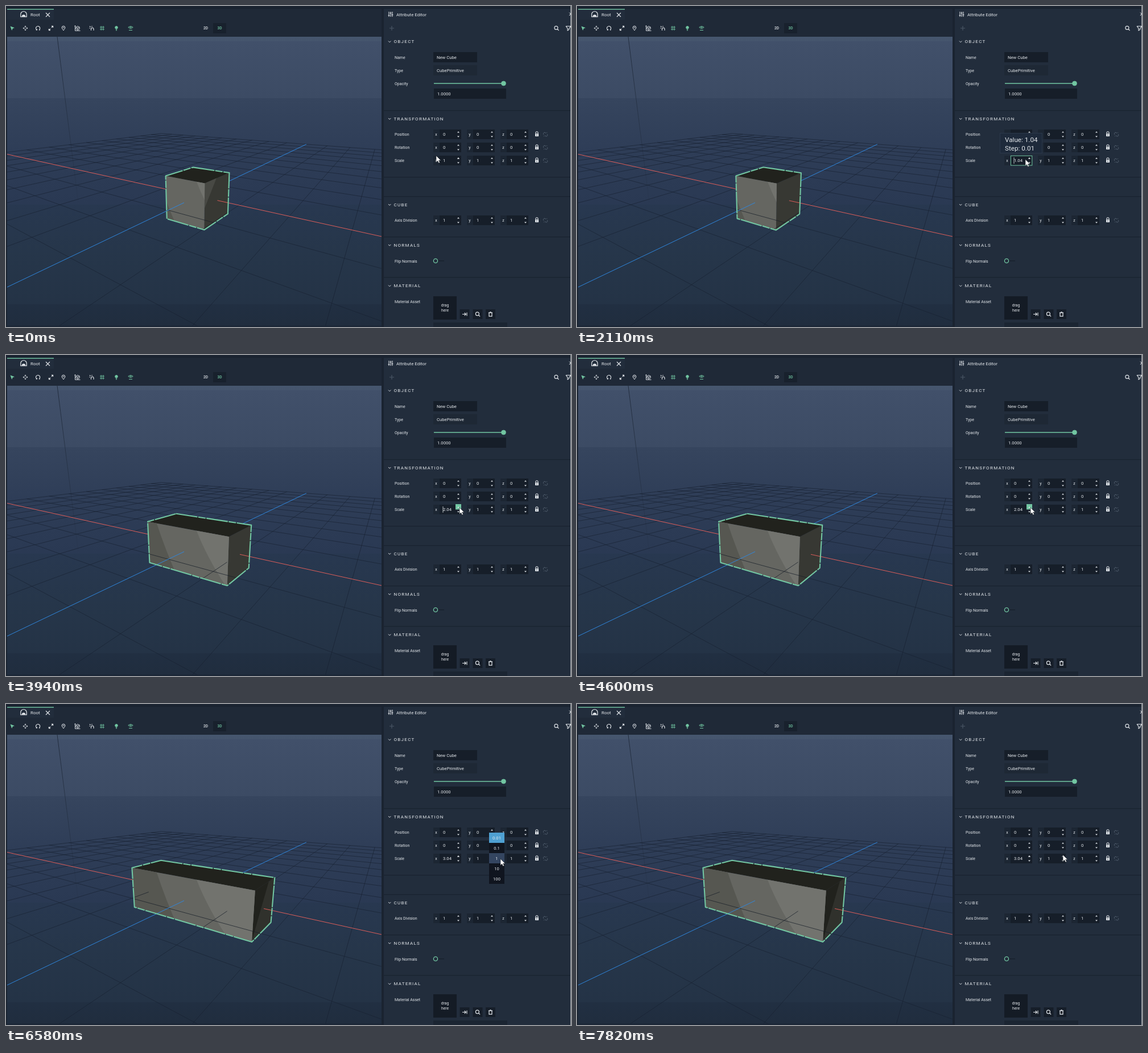
Write an HTML page that moves like this. It is 993 by 564 pixels and loops after 8000 ms.

```html
<!DOCTYPE html>
<html lang="en">
<head>
<meta charset="utf-8">
<title>Attribute editor</title>
<style>
html, body { margin: 0; width: 100%; height: 100%; overflow: hidden; background: #1a2330; }
svg { display: block; width: 993px; height: 564px; font-family: Roboto, sans-serif; }
text { white-space: pre; }
</style>
</head>
<body>
<svg id="stage" viewBox="0 0 993 564"></svg>
<script>
const LOOP = 8000;
const GREEN = '#72c6a2', WHITE = '#e4e8ec', DIM = '#4c5867', FIELD = '#161e29';
const RED = '#dc5d59', BLUE = '#2f86dc';
const stage = document.getElementById('stage');

// markup helpers
const rect = (x, y, w, h, fill, more = '') =>
  `<rect x="${x}" y="${y}" width="${w}" height="${h}" fill="${fill}" ${more}/>`;
const path = (d, stroke, width = 1, more = '') =>
  `<path d="${d}" fill="none" stroke="${stroke}" stroke-width="${width}" ${more}/>`;
const shape = (d, fill, more = '') => `<path d="${d}" fill="${fill}" ${more}/>`;
const text = (x, y, s, size = 7.7, fill = WHITE, more = '') =>
  `<text x="${x}" y="${y + size * 0.36}" font-size="${size}" fill="${fill}" ${more}>${s}</text>`;
const circle = (x, y, r, stroke, width = 1, fill = 'none') =>
  `<circle cx="${x}" cy="${y}" r="${r}" fill="${fill}" stroke="${stroke}" stroke-width="${width}"/>`;
const at = (x, y, inner) => `<g transform="translate(${x} ${y})">${inner}</g>`;

// perspective of the scene: ground plane with unit cells, y up
function weight([x, y, z]) {
  return 1 - 0.0909 * x - 0.0464 * y - 0.1347 * z;
}
function project(p) {
  const [x, y, z] = p, w = weight(p);
  return [(337 + 35.2 * x - 15.3 * y - 90.2 * z) / w,
          (334 - 15.9 * x - 92.8 * y - 23.6 * z) / w].map(n => n.toFixed(1));
}
function segment(a, b) {
  const near = 0.12, wa = weight(a), wb = weight(b);
  if (wa < near && wb < near) return '';
  const cut = a.map((n, i) => n + (b[i] - n) * (wa - near) / (wa - wb));
  if (wa < near) a = cut;
  if (wb < near) b = cut;
  return `M${project(a)}L${project(b)}`;
}
const polygon = points => 'M' + points.map(project).join('L') + 'Z';

// lines start at the given edges, so the same rule draws the whole floor or its front part
function grid(startX, startZ) {
  let d = '';
  for (let k = -10; k <= 10; k++) {
    if (!k) continue;
    d += segment([startX(k), 0, k], [10, 0, k]);
    d += segment([k, 0, startZ(k)], [k, 0, 10]);
  }
  return d;
}
const floorGrid = grid(() => -10, () => -10);

function toolbar() {
  const y = 39;
  const icons = [
    [11, shape('M-3.5-3.5L4-.8L.8.6L-.8 4Z', GREEN)],
    [34, path('M0-4V-1M0 1V4M-4 0H-1M1 0H4M-1.3-2.7L0-4L1.3-2.7M-1.3 2.7L0 4L1.3 2.7M-2.7-1.3L-4 0L-2.7 1.3M2.7-1.3L4 0L2.7 1.3', WHITE, 0.9)],
    [56, path('M-1.6 3.2L-3.2 3.2M-1.6 3.2A3.6 3.6 0 1 1 2 3.1M-1.6 3.4V1.6M2 3.2H3.6', WHITE, 1.1)],
    [79, path('M.8-.8L3.6-3.6M1-3.6H3.6V-1M-.8.8L-3.6 3.6M-1 3.6H-3.6V1', WHITE, 1.1)],
    [101, path('M0 4C-1.5 1.5-2.8.5-2.8-1A2.8 2.8 0 0 1 2.8-1C2.8.5 1.5 1.5 0 4Z', WHITE) + circle(0, -1, 0.7, WHITE, 0.8)],
    [126, path('M-4.5-4.5V4.5H4.5M0-3.5L3.2-1.8V1.6L0 3.2L-3 1.6V-1.8ZM-3-1.8L0 0L3.2-1.8M0 0V3.2M-5.5-3.5L-4.5-4.7L-3.5-3.5', WHITE, 0.9)],
    [151, path('M-1.5 4V1.5A2 2 0 0 1 3 1.5V4M-4-3.5L-2.5-2M0-4V-2.2M-4.5 0H-3', WHITE, 1.1)],
    [169, path('M-1.8-4V4M1.8-4V4M-4-1.8H4M-4 1.8H4', GREEN, 0.9)],
    [194, circle(0, -1.2, 2.4, GREEN, 0.8, GREEN) + path('M-1.2 2.3H1.2M-1 3.8H1', GREEN, 1)],
    [219, path('M-4.2-1.5Q0-5 4.2-1.5Q0 2 -4.2-1.5ZM-3 3.5H3', GREEN, 1) + circle(0, -1.5, 1, GREEN, 0.8)],
  ];
  return icons.map(([x, inner]) => at(x, y, inner)).join('')
    + rect(364, 30, 23, 18, '#18212d')
    + text(351, y, '2D', 6.6, WHITE, 'text-anchor="middle" font-weight="500"')
    + text(375.5, y, '3D', 6.6, GREEN, 'text-anchor="middle" font-weight="500"');
}

function leftSide() {
  return rect(2, 5, 658, 49, '#1f2937') + rect(2, 5, 82, 19, '#222d3c') + rect(2, 5, 82, 1.4, GREEN)
    + at(31, 14.5, path('M-5.2 4.3V0A5.2 5 0 0 1 5.2 0V4.3Z', WHITE, 1.2) + shape('M-3 4.3V2.2Q0-.6 3 2.2V4.3Z', WHITE))
    + text(43, 15, 'Root', 8) + path('M70 12L77 19M77 12L70 19', WHITE, 1.1)
    + toolbar();
}

const search = circle(-0.6, -0.6, 3, WHITE, 1.1) + path('M1.6 1.6L4 4', WHITE, 1.2);
const columns = [751, 810, 869];
const arrows = (x, y) => shape(`M${x - 2} ${y - 3}L${x} ${y - 5.2}L${x + 2} ${y - 3}ZM${x - 2} ${y + 3}L${x} ${y + 5.2}L${x + 2} ${y + 3}Z`, WHITE);

function numberRow(label, y, value, skip) {
  const fields = columns.map((x, i) =>
    rect(x, y - 8.5, 11, 17, '#1c2633') + rect(x + 11, y - 8.5, 38, 17, FIELD)
    + text(x + 5, y, 'xyz'[i], 7, WHITE, 'text-anchor="middle"')
    + (i === skip ? '' : text(x + 17, y, value)) + arrows(x + 44, y)).join('');
  const lock = rect(-3, -1, 6, 4.8, WHITE) + path('M-2-1V-2.4A2 2 0 0 1 2-2.4V-1', WHITE, 1.1) + rect(-0.6, 0.5, 1.2, 1.8, '#222d3c');
  const link = path('M-1-3.3A2.2 2.2 0 0 0-2.8.6M-1-3.3L1-2M1 3.4A2.2 2.2 0 0 0 3-.4M1 3.4L-1 2.2M-3 3.5L-2 2.5M3-3.5L2-2.5', '#536070', 1);
  return text(683, y, label, 7) + fields + at(933, y - 0.3, lock) + at(948, y, link);
}

function section(name, y) {
  return path(`M672 ${y - 1}L674.2 ${y + 1.3}L676.4 ${y - 1}`, WHITE, 0.9)
    + text(681.5, y, name, 8, WHITE, 'letter-spacing="1.3"');
}

function panel() {
  const rules = [183, 300, 334, 405, 476].map(y => rect(664, y, 328, 1.4, '#1a2431')).join('');
  const button = (x, inner) => rect(x - 8.5, 533, 17, 17, FIELD) + at(x, 541.5, inner);
  return rect(664, 5, 329, 559, '#222d3c') + rules
    + path('M673 10V19M676 10V19M679 10V19M671.6 16.5H674.4M674.6 12.5H677.4M677.6 15.5H680.4', WHITE, 1)
    + text(686, 15, 'Attribute Editor', 7.9)
    + path('M990 11.5L994 15.5M994 11.5L990 17', WHITE, 1)
    + path('M674 39H682M678 35V43', DIM, 1.1) + at(967.5, 39, search)
    + path('M984 35.5H993M984 35.5L987 39.3V43L989.6 41.5V39.3L993 35.5', WHITE, 1.1)
    + section('OBJECT', 62.5)
    + text(683, 90.5, 'Name', 7) + rect(751, 81, 77, 18, FIELD) + text(757, 90.5, 'New Cube')
    + text(683, 113.5, 'Type', 7) + rect(751, 104, 77, 18, '#1e2835') + text(757, 113.5, 'CubePrimitive')
    + text(683, 136.5, 'Opacity', 7) + rect(752, 135.3, 122, 1.5, GREEN) + circle(874.5, 136, 4, GREEN, 0.6, GREEN)
    + rect(752, 145, 127, 18, FIELD) + text(758, 154.5, '1.0000')
    + section('TRANSFORMATION', 198)
    + numberRow('Position', 225.5, 0) + numberRow('Rotation', 248.5, 0) + numberRow('Scale', 271.5, 1, 0)
    + section('CUBE', 349) + numberRow('Axis Division', 376.5, 1)
    + section('NORMALS', 420)
    + text(683, 448, 'Flip Normals', 7) + path('M759 447.7H770', '#18212d', 1.4) + circle(755, 447.7, 3.6, GREEN, 1.3)
    + section('MATERIAL', 491.5)
    + text(683, 519.5, 'Material Asset', 7) + rect(751, 510, 41, 41, '#141b25')
    + text(771.5, 526, 'drag', 6.8, WHITE, 'text-anchor="middle"') + text(771.5, 535, 'here', 6.8, WHITE, 'text-anchor="middle"')
    + button(806, path('M-4 0H2M-.2-2.5L2.3 0L-.2 2.5M4-3V3', WHITE, 1.1))
    + button(829, search)
    + button(851.5, path('M-2.5-2V3.6H2.5V-2M-3.5-2.6H3.5M-1-3.8H1', WHITE, 1.2))
    + rect(751, 556, 130, 8, '#1b2532')
    + rect(992, 0, 1, 564, '#fff', 'opacity=".6"');
}

const skyStops = [[0, '#46566e'], [1.6, '#45556d'], [1.6, '#41506a'], [21.1, '#3c4b64'], [21.1, '#36455e'],
  [40, '#2e3d57'], [57.8, '#2a3953'], [57.8, '#283850'], [75, '#26364a'], [92.2, '#243346'], [92.2, '#212f42'], [100, '#202d3e']];

function scene() {
  const line = (a, b, color, id = '') => path(segment(a, b), color, 1, id);
  return rect(2, 54, 658, 510, 'url(#sky)') + `<g clip-path="url(#view)">`
    + path('M90 54L127 345', 'url(#fade)', 1)
    + path(floorGrid, '#172130', 0.9, 'opacity=".7"')
    + line([-10, 0, 0], [10, 0, 0], RED) + line([0, 0, -10], [0, 0, 10], BLUE)
    + shape('', '#21221d', 'id="top"') + shape('', '#363732', 'id="side"') + shape('', '#484944', 'id="wedge"')
    + `<g clip-path="url(#frontClip)">` + rect(200, 260, 300, 180, '#656661')
    + shape('M200 260H254Q272 325 304 396V440H200Z', '#565751')
    + shape('M313 260L335 309Q355 360 394 418V440H500V260Z', '#72736e') + '</g>'
    + `<g clip-path="url(#cubeClip)">` + path('', '#171e28', 0.9, 'id="frontGrid" opacity=".8"')
    + path('', RED, 1, 'id="frontRed"') + line([0, 0, 0.5], [0, 0, 10], BLUE) + '</g>'
    + path('', GREEN, 2.1, 'id="outline" stroke-dasharray="38 1.5 13 1.5" stroke-linejoin="round"')
    + '</g>' + rect(2, 561.5, 658, 2.5, '#1b2636');
}

function menu() {
  const rows = ['0.01', '0.1', '1', '10', '100'].map((s, i) =>
    text(13.5, 9.3 + i * 18, s, 7.6, WHITE, 'text-anchor="middle"')).join('');
  return `<g id="menu">${rect(0, 0, 27, 90, '#10151f')}${rect(0, 0, 27, 18, '#4fa0d2')}`
    + rect(0, 0, 27, 18, '#344560', 'id="hover"') + rows + '</g>';
}

stage.innerHTML = `<defs>
  <linearGradient id="sky" x2="0" y2="1">${skyStops.map(([o, c]) => `<stop offset="${o}%" stop-color="${c}"/>`).join('')}</linearGradient>
  <linearGradient id="fade" x2="0" y2="1"><stop stop-color="#1b2534" stop-opacity=".85"/><stop offset="1" stop-color="#1b2534" stop-opacity=".1"/></linearGradient>
  <clipPath id="view"><rect x="2" y="54" width="658" height="510"/></clipPath>
  <clipPath id="frontClip"><path id="front"/></clipPath>
  <clipPath id="cubeClip"><path id="silhouette"/></clipPath></defs>`
  + rect(0, 0, 993, 564, '#1a2330') + leftSide() + scene() + panel()
  + rect(790, 262, 10, 9.5, GREEN, 'id="press"') + shape('M793 268.5L795 266.3L797 268.5Z', WHITE)
  + text(768, 271.5, '1', 7.7, WHITE, 'id="value"')
  + rect(0, 263.2, 37.4, 16.8, 'none', `id="focus" stroke="${GREEN}" stroke-width="1"`)
  + rect(0, 266, 0.8, 11, WHITE, 'id="caret"')
  + `<g id="tip">${rect(743.5, 223.5, 74, 35, '#1e2a3b', 'stroke="#2b384a"')}`
  + text(752, 234.5, '', 11.7, WHITE, 'id="tipValue"') + text(752, 250, '', 11.7, WHITE, 'id="tipStep"') + '</g>'
  + menu()
  + shape('M0 0V11.4L2.7 9L4.5 13L6.5 12.1L4.7 8.2H8.2Z', '#fff', 'id="cursor" stroke="#1a2028" stroke-width=".6"');

const el = id => document.getElementById(id);
const show = (id, on) => el(id).setAttribute('visibility', on ? 'visible' : 'hidden');
const setPath = (id, d) => el(id).setAttribute('d', d);
const inside = (t, spans) => spans.some(([a, b]) => t >= a && t < b);
const last = (t, keys) => keys.filter(k => k[0] <= t).pop();

// [time, ...state], each held until the next
const cursorKeys = [[0, 756, 263], [120, 763, 264], [250, 773, 266], [390, 782, 268], [520, 788, 269.5],
  [2490, 792, 269], [2620, 795, 268], [2870, 797, 268], [4980, 803, 267], [5110, 814, 267], [5230, 823, 267],
  [5510, 828, 268], [5630, 838, 268], [5760, 848, 267], [5890, 855, 266], [6180, 857, 258],
  [6580, 869, 272], [6710, 862, 269], [6840, 856, 267], [7540, 855, 266], [7820, 854, 265]];
const scaleKeys = [[0, 1], [1180, 1.01], [1310, 1.02], [1570, 1.03], [1710, 1.04], [3940, 2.04], [4610, 3.04]];
const tips = [[1050, 2360], [4730, 4980]];
const menus = [[3000, 3390, 790], [6040, 7270, 849]];
const focusX = [[1050, 2620], [4210, 4480], [4860, 5890]];
const caretX = [[920, 2490], [3510, 4210]];
const caretY = [[7400, 7820]];
const presses = [[3790, 4060], [4480, 4730]];

let drawnScale;
function drawCube(s) {
  if (s === drawnScale) return;
  drawnScale = s;
  const l = -s / 2 + 0.02, r = s / 2, t = 0.485, b = -0.465, f = 0.5, k = -0.5;
  const tl = [l, t, f], tr = [r, t, f], bl = [l, b, f], br = [r, b, f];
  const ktl = [l, t, k], ktr = [r, t, k], kbr = [r, b, k];
  const hull = polygon([ktl, ktr, kbr, br, bl, tl]);
  setPath('top', polygon([tl, tr, ktr, ktl]));
  setPath('side', polygon([tr, ktr, kbr, br]));
  setPath('front', polygon([tl, tr, br, bl]));
  setPath('silhouette', hull);
  setPath('outline', hull);
  setPath('frontGrid', grid(z => z > f ? -10 : r, x => x > r ? -10 : f));
  setPath('frontRed', segment([r, 0, 0], [10, 0, 0]));
  // facet shade on the right side
  const long = s > 3;
  setPath('wedge', long ? polygon([tr, [r, t, -0.16], [r, -0.33, 0.42], br])
    : s === 1 ? polygon([tr, [r, t, 0.06], [r, -0.02, f]]) : '');
  el('wedge').setAttribute('fill', long ? '#21221d' : '#484944');
  el('side').setAttribute('fill', long ? '#30312c' : '#373833');
}

function draw(t) {
  const [, x, y] = last(t, cursorKeys), scale = last(t, scaleKeys)[1];
  el('cursor').setAttribute('transform', `translate(${x} ${y})`);
  drawCube(scale);
  el('value').textContent = scale;
  show('press', inside(t, presses));
  show('focus', inside(t, focusX) || inside(t, caretY));
  el('focus').setAttribute('x', inside(t, caretY) ? 821.4 : 762.4);
  show('caret', inside(t, caretX) || inside(t, caretY));
  el('caret').setAttribute('x', inside(t, caretY) ? 826.6 : 767.6);
  show('tip', inside(t, tips));
  el('tipValue').textContent = 'Value: ' + scale;
  el('tipStep').textContent = 'Step: ' + (t < 3000 ? '0.01' : '1');
  const open = menus.find(([a, b]) => t >= a && t < b);
  el('menu').setAttribute('display', open ? 'inline' : 'none');
  if (open) {
    el('menu').setAttribute('transform', `translate(${open[2]} 226)`);
    el('hover').setAttribute('y', Math.floor((y - 226) / 18) * 18);
  }
}

const start = performance.now();
function frame() {
  draw((performance.now() - start) % LOOP);
  requestAnimationFrame(frame);
}
frame();
</script>
</body>
</html>
```
